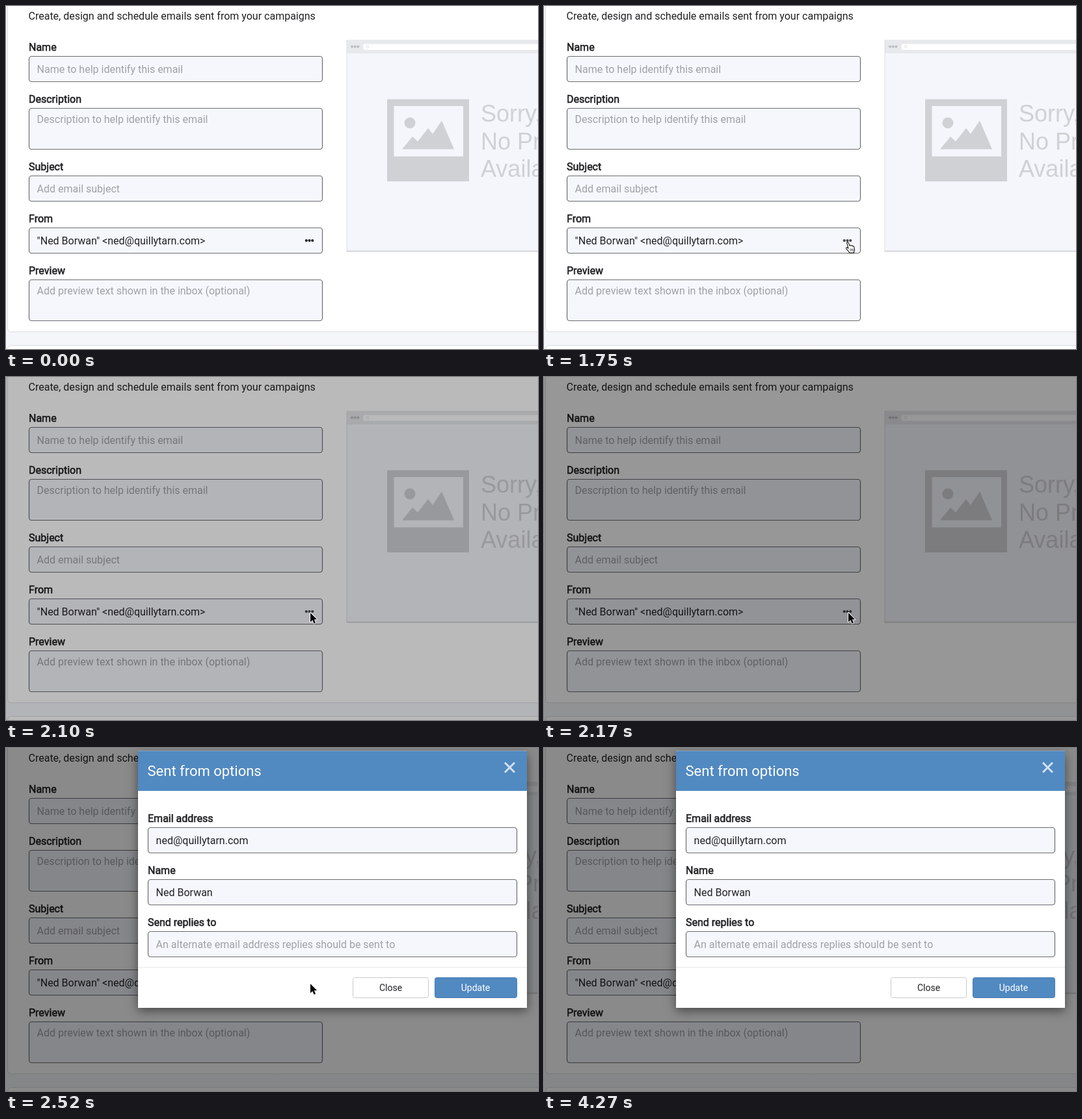
An HTML page with a canvas for the animation above (4.41 s loop, 818 by 528 pixels).

```html
<!DOCTYPE html>
<html lang="en">
<head>
<meta charset="utf-8">
<title>Sender options</title>
<style>
html, body { margin: 0; width: 100%; height: 100%; overflow: hidden; background: #fff; }
canvas { display: block; width: 818px; height: 528px; }
</style>
</head>
<body>
<canvas id="stage" width="818" height="528"></canvas>
<script>
const ctx = document.getElementById('stage').getContext('2d');
const W = 818, H = 528, LOOP = 4410, STEP = 70;
const INK = '#212124', HINT = '#a0a1a5', FIELD = '#f5f7fc', EDGE = '#6c6d72';
const BLUE = '#5189c1', PALE = '#f5f6fb', GHOST = '#d0d1d5';
const SENDER = 'Ned Borwan', ADDRESS = 'ned@quillytarn.com';

const clamp = v => Math.max(0, Math.min(1, v));
const progress = (t, from, to) => clamp((t - from) / (to - from));

function text(str, x, y, color = INK, size = 16, family = 'Roboto', align = 'left') {
  ctx.font = `${size}px ${family}, sans-serif`;
  ctx.textAlign = align;
  ctx.fillStyle = color;
  ctx.fillText(str, x, y);
}

function label(str, x, y) {
  text(str, x, y);
  ctx.strokeStyle = INK;
  ctx.lineWidth = 0.6;
  ctx.strokeText(str, x, y);
}

function rect(x, y, w, h, color) {
  ctx.fillStyle = color;
  ctx.fillRect(x, y, w, h);
}

function box(x, y, w, h, radius, fill, edge, width = 1) {
  ctx.beginPath();
  ctx.roundRect(x + 0.5, y + 0.5, w - 1, h - 1, radius);
  ctx.fillStyle = fill;
  ctx.fill();
  ctx.strokeStyle = edge;
  ctx.lineWidth = width;
  ctx.stroke();
}

function dot(x, y, r, color) {
  ctx.beginPath();
  ctx.arc(x, y, r, 0, Math.PI * 2);
  ctx.fillStyle = color;
  ctx.fill();
}

function dots(x, y, gap, r, color) {
  for (let i = 0; i < 3; i++) dot(x + i * gap, y, r, color);
}

// A titled input; top is the upper edge of the box.
function field(title, x, top, w, h, value, color) {
  label(title, x, top - 8);
  box(x, top, w, h, 4, FIELD, EDGE, 1.2);
  text(value, x + 12.6, top + (h > 40 ? 23 : 26), color);
}

function drawPreview() {
  rect(524, 52, 300, 326, PALE);
  rect(524, 52, 300, 21, '#e8e9ec');
  dots(532, 62.5, 4.7, 1.9, '#b9babd');
  box(549, 58, 280, 10, 2, '#fff', '#f4f4f6');
  ctx.beginPath();
  ctx.arc(556, 62.5, 2, 0, Math.PI * 2);
  ctx.strokeStyle = '#e4e4e7';
  ctx.stroke();
  rect(523.5, 52, 1, 326, '#dddee2');
  rect(524, 376.5, 300, 2, '#d3d4d8');

  rect(586, 143.5, 126, 126.5, GHOST);
  rect(596.5, 154, 106.5, 77.5, PALE);
  dot(621, 180, 8.5, GHOST);
  ctx.beginPath();
  [[609, 220.5], [625, 201], [633, 208.5], [649, 188], [656, 197], [670, 176.5], [689, 220.5]]
    .forEach(p => ctx.lineTo(...p));
  ctx.fill();
  ['Sorry,', 'No Preview', 'Available'].forEach((line, i) =>
    text(line, 730, 178 + i * 42.7, GHOST, 36, '"Liberation Sans"'));
}

function drawPage(hover) {
  rect(0, 0, W, H, '#f5f6fa');
  box(2, -20, 840, 522, 5, '#fff', '#dcdde0');
  box(2, 522, 840, 40, 5, '#fff', '#dcdde0');
  text('Create, design and schedule emails sent from your campaigns', 34.5, 21);
  field('Name', 35, 77, 452, 40, 'Name to help identify this email', HINT);
  field('Description', 35, 157, 452, 64, 'Description to help identify this email', HINT);
  field('Subject', 35, 261, 452, 40, 'Add email subject', HINT);
  field('From', 35, 341, 452, 40, `"${SENDER}" <${ADDRESS}>`, INK);
  field('Preview', 35, 421, 452, 64, 'Add preview text shown in the inbox (optional)', HINT);
  dots(461.8, 361, 4.7, 2.1, hover ? '#47484c' : INK);
  drawPreview();
}

function drawModal(t) {
  const p = progress(t, 2200, 2500);
  if (p === 0) return;
  ctx.save();
  ctx.globalAlpha = progress(t, 2200, 2300);
  ctx.translate(0, -50 * Math.pow(1 - p, 1.75));
  ctx.shadowColor = 'rgba(0,0,0,.5)';
  ctx.shadowBlur = 15;
  ctx.shadowOffsetY = 5;
  rect(203, 4.5, 598, 395.5, '#fff');
  ctx.shadowColor = 'transparent';

  rect(203, 4.5, 598, 61.5, BLUE);
  text('Sent from options', 217.5, 43, '#fff', 22);
  ctx.beginPath();
  ctx.moveTo(767, 22.5); ctx.lineTo(782, 37.5);
  ctx.moveTo(782, 22.5); ctx.lineTo(767, 37.5);
  ctx.strokeStyle = '#d3e1f0';
  ctx.lineWidth = 3;
  ctx.stroke();

  field('Email address', 218, 122, 568, 40, ADDRESS, INK);
  field('Name', 218, 202, 568, 40, SENDER, INK);
  field('Send replies to', 218, 282, 568, 40, 'An alternate email address replies should be sent to', HINT);
  rect(203, 337, 598, 1, '#e8e9ec');
  box(533, 353, 117, 32, 3, '#fff', '#c9cace');
  text('Close', 591.5, 374, INK, 14, 'Roboto', 'center');
  box(659, 353, 127, 32, 3, BLUE, '#477db3');
  text('Update', 722, 374, '#fff', 14, 'Roboto', 'center');
  ctx.restore();
}

const arrow = new Path2D('M0 0V14.2L3.3 11.2L5.6 16.4L8 15.4L5.8 10.3H10.2Z');
const hand = new Path2D('M-2.2 2.2c-.5-1.6 1.6-2.4 2.3-.8l1.8 4.6c.3-1 2-1 2.4.3c.6-.9 2-.7 2.3.5' +
  'c1-.6 2 .1 2.2 1.2l.7 3.5c.3 1.8-.8 2.8-1.2 5.6h-6.6c-.8-2.5-3.2-4.2-5-6.6c-.9-1.4.8-2.4 2-1.4l1.2 1z');
const creases = new Path2D('M2.8 10.5l.5 3.5M5 10.5l.4 3.5M7.1 10.5l.3 3.5');

function pointerAt(t) {
  const left = 1 - progress(t, 490, 1750);
  const exit = Math.pow(progress(t, 3360, 4250), 1.15);
  return {
    x: 468 + 282 * Math.pow(left, 2.58) + 20 * exit,
    y: 363 + 99 * Math.pow(left, 1.94) + 168 * exit
  };
}

function drawPointer({ x, y }, overButton) {
  ctx.save();
  ctx.translate(x, y);
  ctx.lineJoin = 'round';
  if (overButton) {
    ctx.fillStyle = '#fff';
    ctx.fill(hand);
    ctx.strokeStyle = '#111';
    ctx.lineWidth = 1.1;
    ctx.stroke(hand);
    ctx.lineWidth = 0.8;
    ctx.stroke(creases);
  } else {
    ctx.strokeStyle = '#fff';
    ctx.lineWidth = 1.8;
    ctx.stroke(arrow);
    ctx.fillStyle = '#000';
    ctx.fill(arrow);
  }
  ctx.restore();
}

function render(now) {
  const t = Math.floor((now % LOOP) / STEP) * STEP;
  const pointer = pointerAt(t);
  const hover = t >= 490 && pointer.x < 487 && pointer.y < 381;
  drawPage(hover);
  const dim = Math.min(0.46, Math.max(0, (t - 1961) * 0.00195));
  if (dim) rect(0, 0, W, H, `rgba(0,0,0,${dim})`);
  drawModal(t);
  if (t >= 490 && t < 4270) drawPointer(pointer, hover && t < 2030);
}

const start = performance.now();
function tick() {
  render(performance.now() - start);
  requestAnimationFrame(tick);
}
tick();
</script>
</body>
</html>
```
